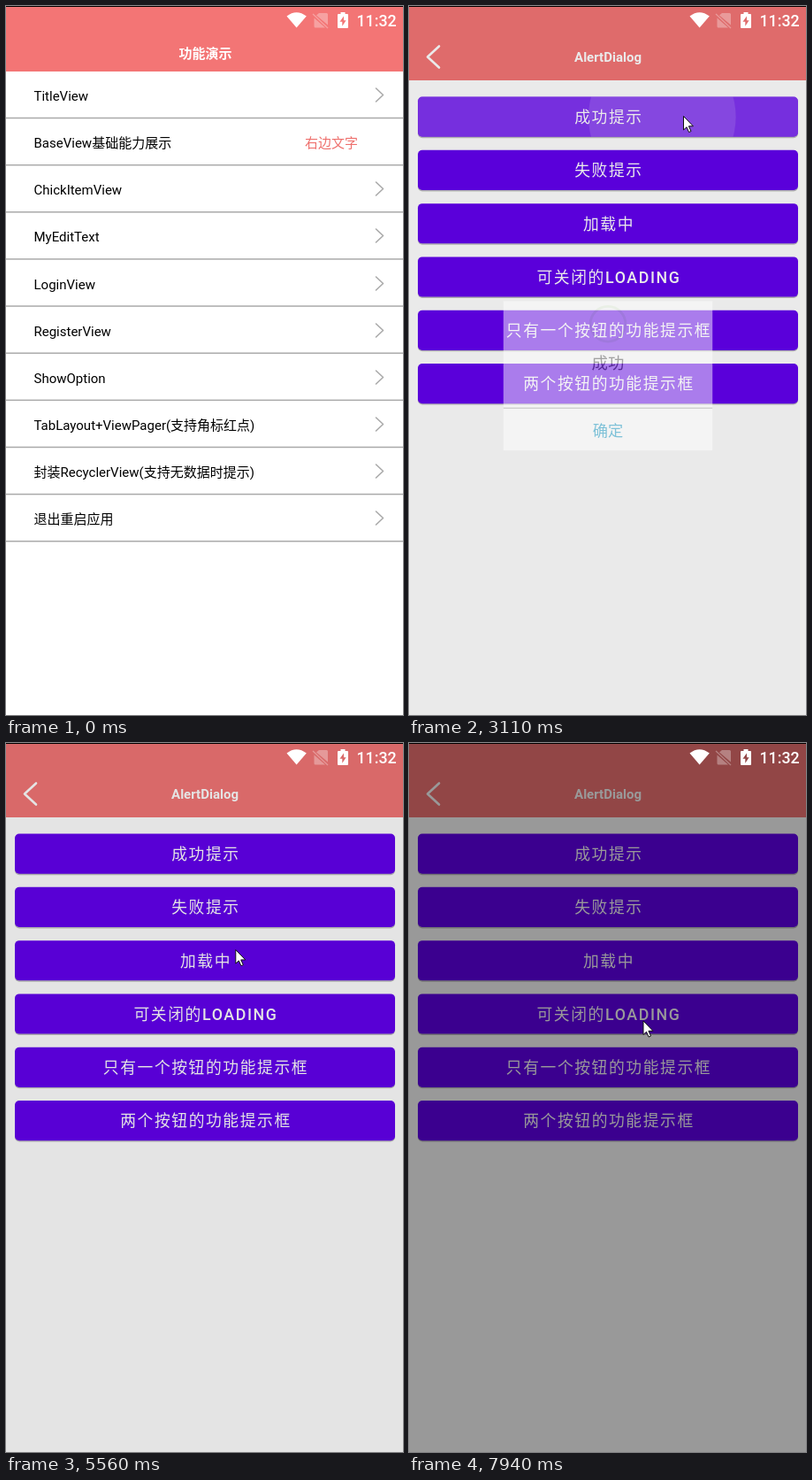
These frames come from a looping animation (449 by 801 pixels, 8 s). An HTML page:

```html
<!DOCTYPE html>
<html lang="zh-CN">
<head>
<meta charset="utf-8">
<title>功能演示</title>
<style>
  html, body { margin: 0; width: 100%; height: 100%; overflow: hidden; background: #fff; }
  svg { display: block; width: 449px; height: 801px; }
  text { font: 15px Roboto, "Noto Sans CJK SC", "Noto Sans CJK", sans-serif; }
  .mid { text-anchor: middle; }
  .bold { font-weight: 700; }
  .line { fill: none; stroke-linecap: round; stroke-linejoin: round; }
  .label { font-size: 17.8px; letter-spacing: 1.59px; fill: #fff; }
  .latin { font-weight: 500; }
  .clock { font-size: 17.8px; font-weight: 500; }
  .heading { font-size: 23.5px; fill: #575757; }
  .detail { font-size: 17.6px; fill: #797979; }
  .confirm { font-size: 22px; fill: #0d98c6; }
</style>
</head>
<body>
<svg viewBox="0 0 449 801">
  <defs>
    <linearGradient id="tickInk" gradientUnits="userSpaceOnUse" x1="209" y1="0" x2="222" y2="0">
      <stop offset=".2" stop-color="#a39f99"/><stop offset="1" stop-color="#a5dc86"/>
    </linearGradient>
  </defs>
  <rect width="449" height="801" fill="#fff"/>

  <g id="listPage">
    <rect width="449" height="74" fill="#f37575"/>
    <text class="mid bold" x="225.5" y="58.5" fill="#fff">功能演示</text>
    <g id="rows"></g>
    <rect id="rowPress" y="127.5" width="449" height="52" opacity="0"/>
  </g>

  <g id="alertPage">
    <rect width="449" height="801" fill="#fff"/>
    <rect width="449" height="84" fill="#f37575"/>
    <path class="line" d="M34 45.5L21 57.5L34 69.5" stroke="#fff" stroke-width="2.6"/>
    <text class="mid bold" x="225" y="63" fill="#fff">AlertDialog</text>
    <g id="buttons"></g>
  </g>

  <rect id="dim" width="449" height="801" opacity="0"/>

  <g id="dialog">
    <rect x="74" y="310" width="302" height="215.5" fill="#fff"/>
    <rect x="74" y="463.6" width="302" height="1.6" fill="#aaa"/>
    <g id="success">
      <circle cx="225" cy="343" r="25.4" fill="none" stroke="#e9f6e1" stroke-width="3.6"/>
      <path id="tick" class="line" d="M211 344L222 354L247.5 331" stroke="url(#tickInk)" stroke-width="4"/>
      <text class="mid heading" x="225" y="408">成功</text>
    </g>
    <g id="failure" fill="none" stroke="#dd6b55">
      <circle id="ring" r="26" stroke-width="3.2"/>
      <path id="cross" class="line" d="M-9 -9L9 9M9 -9L-9 9" stroke-width="3.4"/>
      <g stroke="none">
        <text class="mid heading" x="225" y="408">提示</text>
        <text class="mid detail" x="225" y="446.5">失败</text>
      </g>
    </g>
    <text class="mid confirm" x="225" y="504.5">确定</text>
  </g>

  <g fill="#fff">
    <path d="M317.5 11.6Q328.5 3 339.8 11.6L328.6 24.6Z"/>
    <g opacity=".32">
      <path d="M354 8H362.5Q364 8 364 9.5V21.5L351 10.5Z"/>
      <path d="M348.5 13.5L361 24.5H350Q348.5 24.5 348.5 23Z"/>
      <path d="M347 9L364 25" stroke="#fff" stroke-width="1.2"/>
    </g>
    <path fill-rule="evenodd" d="M375 10Q375 9 376 9H378.5V7H383.5V9H386Q387 9 387 10V24Q387 25 386 25H376Q375 25 375 24ZM382 11.5L377.5 17.8H380.3V22.8L384.6 16.2H382Z"/>
    <text class="clock" x="396.5" y="23">11:32</text>
  </g>
  <rect width="449" height="1"/>
  <path id="cursor" d="M.5 .5V16L4 12.8L6.6 18.6L9 17.5L6.4 11.8H11.4Z" fill="#fff" stroke="#111"/>
</svg>

<script>
const LOOP = 8000;
const $ = id => document.getElementById(id);
const show = (el, on) => el.setAttribute('display', on ? 'inline' : 'none');
const fade = (el, v) => el.setAttribute('opacity', v);

// Progress 0..1 from start over length; power > 1 slows towards the end.
function tween(t, start, length, power = 1) {
  const p = Math.min(1, Math.max(0, (t - start) / length));
  return 1 - (1 - p) ** power;
}

const rows = ['TitleView', 'BaseView基础能力展示', 'ChickItemView', 'MyEditText', 'LoginView', 'RegisterView',
  'ShowOption', 'TabLayout+ViewPager(支持角标红点)', '封装RecyclerView(支持无数据时提示)', '退出重启应用'];
$('rows').innerHTML = rows.map((name, i) => {
  const top = 53.13 * i, base = Math.round(top + 107);
  const side = i === 1
    ? `<text id="sideText" x="338" y="${base}">右边文字</text>`
    : `<path class="line" d="M418.5 ${base - 14}l8 7.5l-8 7.5" stroke="#aaa" stroke-width="1.6"/>`;
  return `<text x="31.5" y="${base}">${name}</text>${side}
    <rect y="${top + 125.8}" width="449" height="1.5" fill="#aaa"/>`;
}).join('');

const labels = ['成功提示', '失败提示', '加载中', '可关闭的<tspan class="latin">LOADING</tspan>',
  '只有一个按钮的功能提示框', '两个按钮的功能提示框'];
$('buttons').innerHTML = labels.map((label, i) => {
  const y = 102.6 + 60.27 * i;
  const box = `x="10" y="${y}" width="430" height="45.2" rx="5"`;
  return `<clipPath id="clip${i}"><rect ${box}/></clipPath>
    <rect ${box} transform="translate(0 1.4)" opacity=".25"/>
    <rect ${box} fill="#6200ee"/>
    <g id="press${i}" clip-path="url(#clip${i})" fill="#fff" display="none">
      <rect ${box} opacity=".2"/><circle cy="${y + 22.7}" opacity=".13"/>
    </g>
    <text class="label mid" x="226" y="${Math.round(y + 29.4)}">${label}</text>`;
}).join('');

const presses = [
  { button: 0, start: 2910, x: 310, radius: 32 },
  { button: 1, start: 5960, x: 261, radius: 47 }
];
const dialogs = [
  { id: 'success', open: 3079, close: 5100 },
  { id: 'failure', open: 5983, close: 7730 }
];
const moves = [
  { at: 270, length: 800, x: 247, y: 230 },
  { at: 1140, length: 560, x: 296, y: 145 },
  { at: 2630, length: 140, x: 310, y: 124 },
  { at: 4215, length: 475, x: 243, y: 493 },
  { at: 5150, length: 660, x: 262, y: 190, power: 2 },
  { at: 6900, length: 760, x: 213, y: 499 },
  { at: 7680, length: 260, x: 264.5, y: 313.5 }
];

function drawCursor(t) {
  let x = 43, y = 372;
  for (const m of moves) {
    const p = tween(t, m.at, m.length, m.power);
    x += (m.x - x) * p;
    y += (m.y - y) * p;
  }
  show($('cursor'), t >= moves[0].at);
  $('cursor').setAttribute('transform', `translate(${x} ${y})`);
}

function drawPress({ button, start, x, radius }, t) {
  const age = t - start, group = $('press' + button), circle = group.lastElementChild;
  const grow = tween(age, 0, 720);
  show(group, age >= 0 && age < 600);
  circle.setAttribute('cx', x + (225 - x) * grow);
  circle.setAttribute('r', radius + 184 * grow);
  fade(group, tween(age, 0, 70) - tween(age, 350, 250));
}

function drawDialog(t) {
  const current = dialogs.find(d => t >= d.open && t < d.close + 150);
  show($('dialog'), current);
  if (!current) return;
  for (const d of dialogs) show($(d.id), d === current);

  const age = t - current.open, out = tween(t, current.close, 150);
  const pop = .7 + .35 * tween(age, 0, 135) - .1 * tween(age, 135, 105) + .05 * tween(age, 240, 60);
  $('dialog').setAttribute('transform',
    `translate(225 417.7) scale(${pop * (1 - .4 * out)}) translate(-225 -417.7)`);
  fade($('dialog'), (.2 + .8 * tween(age, 0, 90)) * (1 - out));

  // The tick overshoots, then its long arm settles back.
  const tick = 49.2 * tween(age, 320, 260) - 6 * tween(age, 651, 209);
  show($('tick'), tick > 0);
  $('tick').setAttribute('stroke-dasharray', `${tick} 99`);

  const turn = (1 - Math.cos(Math.PI * tween(age, 0, 400))) / 2;
  const tilt = Math.cos((1 - turn) * 100 * Math.PI / 180);
  $('ring').setAttribute('transform', `translate(225 343) scale(1 ${tilt})`);
  fade($('ring'), turn);

  const grow = .4 + .75 * tween(age, 400, 110) - .15 * tween(age, 510, 77);
  show($('cross'), age > 400);
  $('cross').setAttribute('transform', `translate(225 343) scale(${grow})`);
}

function draw(t) {
  const shade = dialogs.reduce((sum, d) =>
    sum + tween(t, d.open - 30, 380, 1.3) - tween(t, d.close + 270, 300, 1.3), 0);
  const pressed = tween(t, 1600, 100);
  fade($('dim'), .4 * shade);
  fade($('alertPage'), tween(t, 2020, 90));
  fade($('rowPress'), .1 * (pressed - tween(t, 1700, 140)));
  $('sideText').setAttribute('fill', `rgb(${238 - 38 * pressed},${111 - 16 * pressed},${108 - 18 * pressed})`);
  presses.forEach(p => drawPress(p, t));
  drawDialog(t);
  drawCursor(t);
}

const begin = performance.now();
function run() {
  draw((performance.now() - begin) % LOOP);
  requestAnimationFrame(run);
}
run();
</script>
</body>
</html>
```
